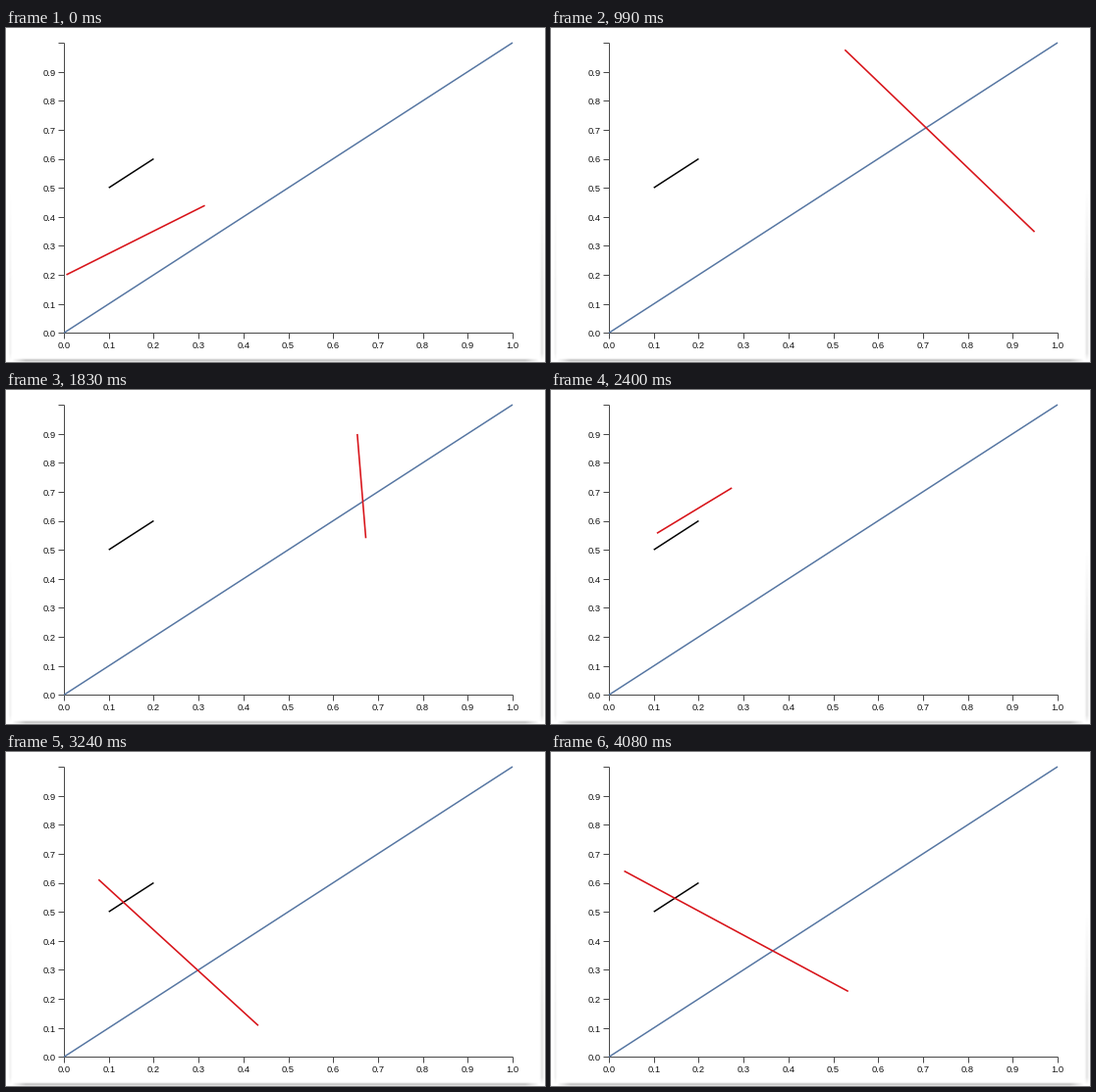
A matplotlib script that plays this animation: 549 px wide and 341 px high, repeating every 4.26 s.

```python
import numpy as np
import matplotlib.pyplot as plt
from matplotlib.animation import FuncAnimation

W, H, DPI = 549, 341, 100
STEP, LOOP = 30, 4260
START, PERIOD, MOVE = -297, 502, 400
PX = 72 / DPI  # one pixel in points

# Resting positions of the red line: x1, y1, x2, y2
POSES = np.array([
    [.080, .300, .220, .400],
    [.000, .193, .321, .442],
    [.551, .909, .559, .205],
    [.523, .983, .992, .364],
    [.7237, .9247, .7238, .526],
    [.060, .680, .240, .660],
    [.175, .379, .323, .790],
    [.077, .611, .433, .108],
    [.300, .800, .620, .160],
    [.033, .640, .533, .226],
])


def sx(v):
    return 59 + 457 * np.asarray(v)


def sy(v):
    return 311.3 - 296.3 * np.asarray(v)


def ease(u):
    return 4 * u**3 if u < .5 else 1 - 4 * (1 - u)**3


def pose(t):
    k = min(int((t - START) // PERIOD), len(POSES) - 2)
    u = min((t - START - k * PERIOD) / MOVE, 1)
    return POSES[k] + ease(u) * (POSES[k + 1] - POSES[k])


def panel_shadow():
    y, x = np.mgrid[0:H, 0:W] + .5
    fade = np.clip((x - 6) / 14, 0, 1) * np.clip((543 - x) / 14, 0, 1)
    bottom = .23 * np.exp(-((y - 339.3) / 1.5)**2) * fade
    grow = np.clip((y - 160) / 110, 0, 1) * np.clip((340 - y) / 8, 0, 1)
    left = .05 * np.exp(-((x - 4.5) / 1.3)**2) * grow
    right = .10 * np.exp(-((x - 546) / 1.8)**2) * grow
    return 1 - np.maximum.reduce([bottom, left, right])


fig = plt.figure(figsize=(W / DPI, H / DPI), dpi=DPI, facecolor="white")
ax = fig.add_axes([0, 0, 1, 1])
ax.axis("off")
ax.imshow(panel_shadow(), cmap="gray", vmin=0, vmax=1, aspect="auto",
          extent=(0, W, H, 0), interpolation="nearest", zorder=0)
ax.set_xlim(0, W)
ax.set_ylim(H, 0)


def stroke(xs, ys, color, width, **kw):
    return ax.plot(xs, ys, color=color, lw=width * PX,
                   solid_capstyle="butt", **kw)[0]


def label(x, y, text, ha):
    ax.text(x, y, text, ha=ha, va="center_baseline", color="#111111",
            family="Liberation Sans", fontsize=9.4 * PX)


AXIS = "#4a4a4a"
left, right, top, base = sx(0), sx(1), sy(1), sy(0)
stroke([left, left], [top, base], AXIS, 1)
stroke([left, right], [base, base], AXIS, 1)
for v in np.arange(11) / 10:
    x, y = sx(v), sy(v)
    stroke([x, x], [base, base + 6], AXIS, 1)
    stroke([left - 6, left], [y, y], AXIS, 1)
    label(x, base + 12, f"{v:.1f}", "center")
    if v < 1:
        label(left - 8.5, y + .4, f"{v:.1f}", "right")

stroke(sx([0, 1]), sy([0, 1]), "#5676a2", 1.5)
stroke(sx([.1, .2]), sy([.5, .6]), "#000000", 1.5)
red = stroke([], [], "#d8141a", 1.6, zorder=5)


def draw(i):
    x1, y1, x2, y2 = pose(i * STEP)
    red.set_data(sx([x1, x2]), sy([y1, y2]))
    return red,


anim = FuncAnimation(fig, draw, frames=LOOP // STEP, interval=STEP,
                     repeat=True, repeat_delay=0)
plt.show()
```
